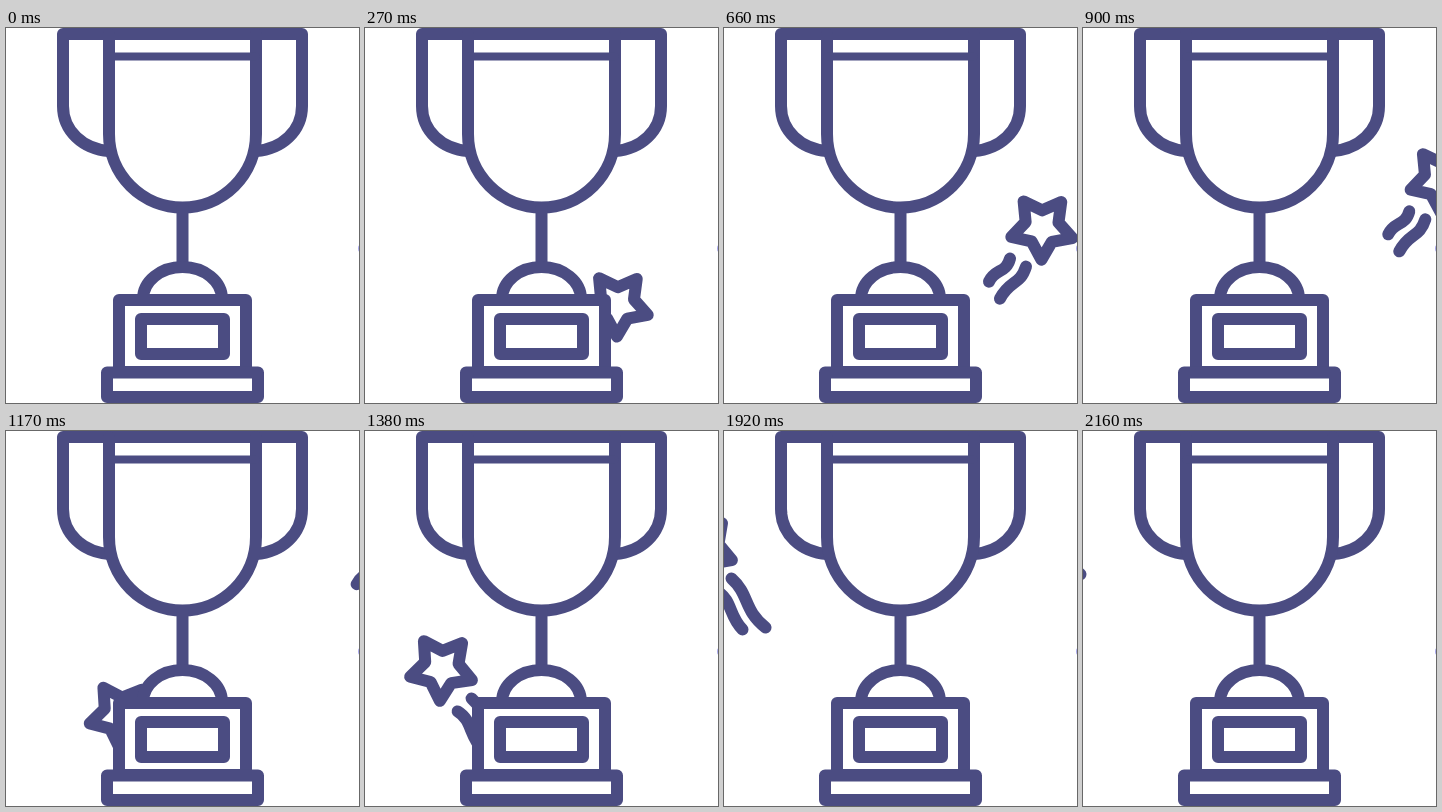
An HTML page for the animation above (2190 ms loop, 353 by 375 pixels).

```html
<!DOCTYPE html>
<html lang="en">
<head>
<meta charset="utf-8">
<title>Trophy with shooting stars</title>
<style>
  html, body { margin: 0; width: 100%; height: 100%; overflow: hidden; background: #fff; }
  svg { display: block; width: 100vw; height: 100vh; }
  .ink { fill: none; stroke: #4b4c82; stroke-width: 12; stroke-linecap: round; stroke-linejoin: round; }
  .solid { fill: #fff; }
</style>
</head>
<body>
<svg viewBox="0 0 353 375">
  <g class="ink">
    <g id="right">
      <path class="star"/>
      <path d="M-32 31C-36 46 -47 41 -53 54M-16 39C-22 58 -32 52 -42 71"/>
    </g>
    <g id="left">
      <path class="star"/>
      <path d="M16 43C31 52 27 67 41 81M30 30C48 46 42 62 64 79"/>
    </g>
    <!-- The trophy is opaque, so the stars emerge from behind it. -->
    <path d="M103 123C77 121 57 103 57 78V6H296V78C296 103 276 121 250 123"/>
    <path d="M103 6V106A73.5 73.5 0 0 0 250 106V6"/>
    <path d="M103 28.5H250" stroke-width="8" style="stroke-width:8"/>
    <path d="M176.5 180V238"/>
    <path class="solid" d="M137 271A39.5 32 0 0 1 216 271"/>
    <path class="solid" d="M113 272H240V344H113Z"/>
    <path d="M135 291H218V326H135Z"/>
    <path class="solid" d="M101 344.5H252V369H101Z"/>
  </g>
  <ellipse cx="355" cy="220.5" rx="3" ry="4" fill="#a9a8ee"/>
</svg>
<script>
  const LOOP = 2190, STEP = 30, FIRST_HOLD = 60;

  // Position of each star's centre at a reference time, with its speed in px/ms.
  const stars = [
    { id: 'right', at: 450, x: 282.7, y: 241, vx: 0.168, vy: -0.197, radius: 32, tilt: 1 },
    { id: 'left', at: 1380, x: 76.6, y: 237.4, vx: -0.1835, vy: -0.222, radius: 32.5, tilt: 3 }
  ];

  function starPath(radius, tilt) {
    const points = Array.from({ length: 10 }, (_, i) => {
      const angle = (90 + tilt + i * 36) * Math.PI / 180;
      const r = i % 2 ? radius * 0.54 : radius;
      return `${(r * Math.cos(angle)).toFixed(2)} ${(r * Math.sin(angle)).toFixed(2)}`;
    });
    return `M${points.join('L')}Z`;
  }

  for (const star of stars) {
    star.node = document.getElementById(star.id);
    star.node.querySelector('.star').setAttribute('d', starPath(star.radius, star.tilt));
  }

  function draw(time) {
    const t = time < FIRST_HOLD ? 0 : Math.floor(time / STEP) * STEP;
    for (const { node, at, x, y, vx, vy } of stars) {
      const dt = t - at;
      node.setAttribute('transform', `translate(${x + vx * dt} ${y + vy * dt})`);
    }
  }

  const start = performance.now();
  function tick() {
    draw((performance.now() - start) % LOOP);
    requestAnimationFrame(tick);
  }
  tick();
</script>
</body>
</html>
```
